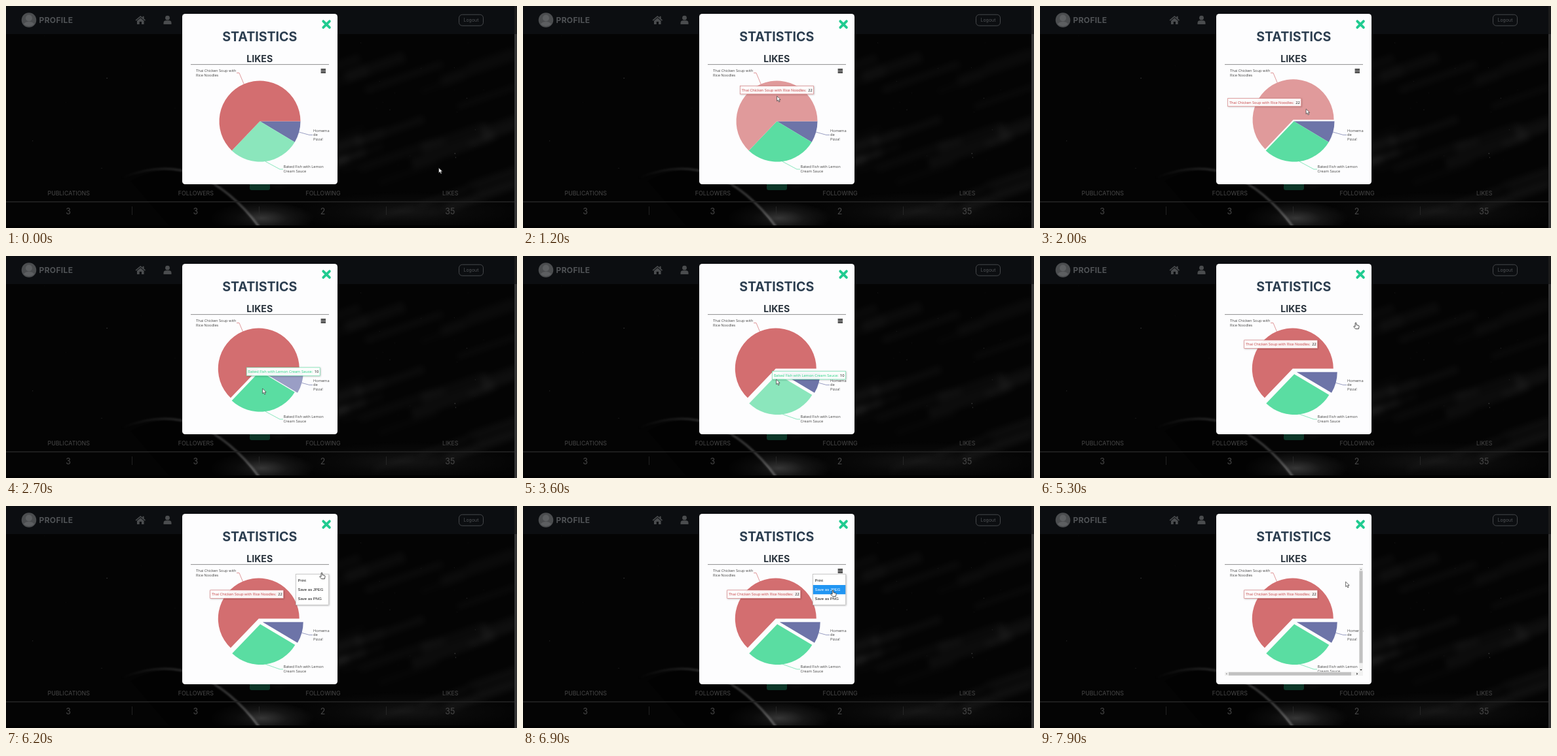
These frames come from a looping animation (780 by 340 pixels, 8 s). An HTML page:

```html
<!DOCTYPE html>
<html lang="en">
<head>
<meta charset="utf-8">
<title>Statistics</title>
<style>
  html, body { margin: 0; width: 100%; height: 100%; overflow: hidden; background: #000; }
  svg { display: block; width: 780px; height: 340px; }
  text { white-space: pre; }
  .ui { font-family: Montserrat, Inter, sans-serif; }
  .mid { text-anchor: middle; }
  .chart { font-family: "Trebuchet MS", "Open Sans", sans-serif; font-size: 5.7px; fill: #444; }
  .menu { font-family: Arial, "Liberation Sans", sans-serif; font-size: 6px; }
</style>
</head>
<body>
<svg viewBox="0 0 780 340" xmlns="http://www.w3.org/2000/svg">
  <defs>
    <radialGradient id="glow">
      <stop offset="0" stop-color="#fff" stop-opacity=".2"/>
      <stop offset=".5" stop-color="#fff" stop-opacity=".07"/>
      <stop offset="1" stop-color="#fff" stop-opacity="0"/>
    </radialGradient>
    <linearGradient id="rim">
      <stop offset="0" stop-color="#fff" stop-opacity="0"/>
      <stop offset=".45" stop-color="#fff" stop-opacity=".17"/>
      <stop offset="1" stop-color="#fff" stop-opacity=".3"/>
    </linearGradient>
    <filter id="soft" x="-20%" y="-20%" width="140%" height="140%"><feGaussianBlur stdDeviation="1.6"/></filter>
    <filter id="haze" filterUnits="userSpaceOnUse" x="0" y="0" width="780" height="340"><feGaussianBlur stdDeviation="5"/></filter>
    <filter id="shadow" x="-20%" y="-40%" width="140%" height="200%">
      <feDropShadow dx=".7" dy=".7" stdDeviation=".8" flood-opacity=".3"/>
    </filter>
  </defs>

  <rect width="780" height="340" fill="#040404"/>
  <g id="sky">
    <g id="wisps" stroke="#fff" filter="url(#haze)"></g>
    <ellipse cx="390" cy="325" rx="80" ry="26" fill="url(#glow)"/>
    <ellipse cx="610" cy="315" rx="190" ry="32" fill="url(#glow)" opacity=".35"/>
    <path d="M190 268Q240 240 290 261Q345 285 384 338H250Z" fill="#000" opacity=".5"/>
    <path d="M175 264Q235 238 290 258Q345 282 386 338" fill="none" stroke="url(#rim)" stroke-width="3" filter="url(#soft)"/>
  </g>

  <rect width="776" height="43" fill="#0c0e11"/>
  <circle cx="35" cy="21.5" r="11.3" fill="#4b4d4f"/>
  <g fill="#5d5f61">
    <circle cx="35" cy="18.5" r="5"/>
    <path d="M27 28Q29 24 35 24T43 28Q35 34 27 28Z"/>
  </g>
  <text class="ui" x="50.5" y="26" font-size="12" font-weight="700" letter-spacing=".35" fill="#505356">PROFILE</text>
  <g fill="#4a4c4e">
    <path d="M197.6 21.5L205.3 15L208.5 17.7V15.8H210.6V19.4L213 21.5L212 22.7L205.3 17.1L198.6 22.7Z"/>
    <path d="M200 22.7L205.3 18.3L210.6 22.7V28H207V24H203.7V28H200Z"/>
    <circle cx="246.5" cy="18.2" r="3.4"/>
    <path d="M240.5 28V26Q240.5 22.3 244 22.3H249Q252.5 22.3 252.5 26V28Z"/>
  </g>
  <rect x="691.5" y="13.2" width="37" height="17" rx="5" fill="none" stroke="#45474a"/>
  <text class="ui mid" x="710" y="24.2" font-size="7" fill="#505356">Logout</text>

  <path d="M0 299.8H776" stroke="#202020" stroke-width="1.8"/>
  <path d="M192.5 307V320M386.5 307V320M580.5 307V320" stroke="#2b2b2b" stroke-width=".8"/>
  <rect y="336" width="776" height="4" fill="#010101"/>
  <rect x="372" y="262" width="31" height="20" rx="3" fill="#0b3527"/>
  <g id="totals" class="ui mid" fill="#484848"></g>
  <rect x="776" width="4" height="340" fill="#1c1c1c"/>
  <rect x="776" y="43" width="4" height="297" fill="#343434"/>

  <rect x="269" y="12" width="237" height="261" rx="4.5" fill="#fdfdfe"/>
  <path d="M484.3 23.3L493.9 32.9M493.9 23.3L484.3 32.9" stroke="#20cb90" stroke-width="3.8" stroke-linecap="round"/>
  <text class="ui mid" x="387.3" y="54" font-size="19.6" font-weight="700" fill="#2c3e50">STATISTICS</text>
  <text class="ui mid" x="387.2" y="86" font-size="14.1" font-weight="700" fill="#28323c">LIKES</text>
  <path d="M282 89.6H493" stroke="#858585" stroke-width=".9"/>

  <g id="pie"></g>
  <g class="chart">
    <text x="290" y="101">Thai Chicken Soup with</text><text x="290" y="107.5">Rice Noodles</text>
    <text x="469" y="192.5">Homema</text><text x="469" y="199.2">de</text><text x="469" y="205.8">Pizza!</text>
    <text x="423.5" y="248.4">Baked Fish with Lemon</text><text x="423.5" y="255">Cream Sauce</text>
  </g>
  <path id="burger" d="M480.6 97H488M480.6 99.5H488M480.6 102H488" stroke="#000" stroke-width="1.3"/>

  <g id="tip" class="chart">
    <g filter="url(#shadow)"><rect id="tipBox" x=".5" y=".5" height="12.4" fill="#fff" fill-opacity=".92" stroke-width=".6"/></g>
    <text id="tipName" x="2.7" y="8.7" stroke-width=".12"></text>
    <text id="tipValue" y="8.7" fill="#111"></text>
  </g>

  <g id="menu" class="menu">
    <rect x="442.5" y="104.5" width="50" height="47" fill="#fff" stroke="#b5b5b5" stroke-width=".6" filter="url(#shadow)"/>
    <rect id="pick" x="442.8" width="49.4" height="14.2" fill="#2196f3"/>
  </g>

  <g id="bars">
    <path d="M282 254H487V94H493V260H282Z" fill="#f1f1f1"/>
    <rect x="487.5" y="99.5" width="5" height="141" fill="#c1c1c1"/>
    <rect x="288" y="254.5" width="187" height="5" fill="#c1c1c1"/>
    <path d="M488.5 98L490 96L491.5 98ZM285.5 255.5L283.5 257L285.5 258.5Z" fill="#999"/>
    <path d="M488.3 250L490 252.2L491.7 250ZM483.2 255.2L485.4 257L483.2 258.8Z" fill="#444"/>
  </g>

  <path id="arrow" d="M-.4 0V7.6L1.4 6L2.7 9L4.1 8.4L2.8 5.5H5.2Z" fill="#fff" stroke="#333" stroke-width=".7"/>
  <path id="hand" d="M-.9 5.5V.6Q0-.6 .9 .6V3.6L4.3 4.4Q5.2 4.7 5.1 5.7L4.4 9.6H-.3L-3.2 6.3Q-3 5-1.8 5.5L-.9 6.3Z" fill="#fff" stroke="#222" stroke-width=".8"/>
</svg>
<script>
const LOOP = 8000, STEP = 100, MENU_OPENS = 5500, PRINTS = 7800;
const CENTER = { x: 387.5, y: 176.6 }, RADIUS = 62, PULL = 4.4;
const CHART = { left: 282, right: 493 }, ROW = { top: 106.8, height: 14.2 };
const TURN = Math.PI * 2;
const $ = id => document.getElementById(id);

function set(node, attrs) {
  for (const key in attrs) node.setAttribute(key, attrs[key]);
}
function add(parent, tag, attrs, text = '') {
  const node = document.createElementNS('http://www.w3.org/2000/svg', tag);
  set(node, attrs);
  node.textContent = text;
  return parent.appendChild(node);
}
const show = (node, on) => set(node, { visibility: on ? 'visible' : 'hidden' });
const place = (node, x, y) => set(node, { transform: `translate(${x} ${y})` });
const polar = (angle, r) => [r * Math.cos(angle), r * Math.sin(angle)];

const slices = [
  { name: 'Homemade Pizza!:', value: 3, color: '#6d74a8', light: '#9a9ec5', width: 61, clicked: 2300, lead: '463 197.5H468' },
  { name: 'Baked Fish with Lemon Cream Sauce:', value: 10, color: '#5adda2', light: '#8be6bc', width: 113, clicked: 3000, lead: '418 250H423' },
  { name: 'Thai Chicken Soup with Rice Noodles:', value: 22, color: '#d36e70', light: '#e09a9b', width: 113, clicked: 1900, lead: '356 102.5H352' }
];
const fish = slices[1];
const total = slices.reduce((sum, s) => sum + s.value, 0);

// The few places the pointer heads for: arrival time, x, y.
const stops = [
  [0, 661, 248], [500, 565, 268], [900, 448, 172], [1000, 437, 142], [1200, 388, 138],
  [1500, 425, 225], [1900, 400, 150], [2300, 426, 181], [2600, 426, 181], [2700, 392, 203],
  [3200, 390, 209], [4000, 382, 152], [4300, 382, 152], [4800, 441, 145], [5200, 482, 102],
  [6200, 482, 102], [6900, 473, 129], [7100, 472, 141], [7600, 467, 116], [LOOP, 467, 116]
];
stops.splice(11, 0, [3600, 387, 189]);

function pointer(t) {
  const i = Math.max(1, stops.findIndex(s => s[0] >= t));
  const [t0, x0, y0] = stops[i - 1], [t1, x1, y1] = stops[i];
  const p = (t - t0) / (t1 - t0);
  return { x: x0 + (x1 - x0) * p, y: y0 + (y1 - y0) * p };
}

function sliceUnder({ x, y }) {
  const dx = x - CENTER.x, dy = y - CENTER.y;
  if (Math.hypot(dx, dy) > RADIUS) return null;
  const angle = (Math.atan2(dy, dx) + TURN) % TURN;
  return slices.find(s => angle < s.end);
}

// The tooltip belongs to the last slice touched, left of the pointer where it fits.
function tipGoal(t) {
  for (; t >= 0; t -= STEP) {
    const spot = pointer(t), slice = sliceUnder(spot);
    if (!slice) continue;
    let x = spot.x - 5 - slice.width;
    if (x < CHART.left) x = Math.min(spot.x + 5, CHART.right - slice.width);
    return { slice, x, y: spot.y - 18 };
  }
  return null;
}

// Trails the pointer by averaging its recent goals.
function tooltip(t) {
  const goals = [0, 1, 2].map(k => tipGoal(t - k * STEP)).filter(Boolean);
  if (!goals.length) return null;
  const mean = key => goals.reduce((sum, g) => sum + g[key], 0) / goals.length;
  return { slice: goals[0].slice, x: mean('x'), y: mean('y') };
}

function buildPie() {
  let start = 0;
  for (const s of slices) {
    s.end = start + s.value / total * TURN;
    s.middle = (start + s.end) / 2;
    const large = s.end - start > Math.PI ? 1 : 0;
    s.line = add($('pie'), 'path', { fill: 'none', stroke: s.color, 'stroke-width': .7 });
    s.shape = add($('pie'), 'path', {
      d: `M0 0L${polar(start, RADIUS)}A${RADIUS} ${RADIUS} 0 ${large} 1 ${polar(s.end, RADIUS)}Z`
    });
    start = s.end;
  }
}

function buildSky() {
  let seed = 7;
  const random = () => (seed = seed * 16807 % 2147483647) / 2147483647;
  for (let i = 0; i < 45; i++) {
    add($('sky'), 'circle', { cx: random() * 776, cy: 45 + random() * 210, r: .3 + random() * .5, fill: '#fff', opacity: random() * .22 });
  }
  for (let i = 0; i < 30; i++) {
    const x = 400 + random() * 330, y = 90 + random() * 240, length = 60 + random() * 90;
    add($('wisps'), 'path', { d: `M${x} ${y}l${length} ${-length * .35}`, 'stroke-width': 5 + random() * 14, opacity: .01 + random() * .03 });
  }
}

function buildLabels() {
  [['PUBLICATIONS', 3], ['FOLLOWERS', 3], ['FOLLOWING', 2], ['LIKES', 35]].forEach(([label, count], i) => {
    const x = 95.7 + i * 194.2;
    add($('totals'), 'text', { x, y: 290, 'font-size': 8.9 }, label);
    add($('totals'), 'text', { x: x - .5, y: 318.6, 'font-size': 12.4 }, count);
  });
  ['Print', 'Save as JPEG', 'Save as PNG'].forEach((label, i) => {
    add($('menu'), 'text', { x: 445.5, y: ROW.top + 9.2 + i * ROW.height }, label);
  });
}

function drawPie(t, lit) {
  const [px, py] = [CENTER.x, CENTER.y];
  for (const s of slices) {
    const p = Math.min(1, Math.max(0, (t - s.clicked) / 300));
    const pull = PULL * p * (2 - p);
    const [dx, dy] = polar(s.middle, pull), [ex, ey] = polar(s.middle, pull + RADIUS);
    place(s.shape, px + dx, py + dy);
    set(s.shape, { fill: s === lit ? s.light : s.color });
    set(s.line, { d: `M${px + ex} ${py + ey}L${s.lead}` });
  }
}

function drawTip(tip) {
  show($('tip'), !!tip);
  if (!tip) return;
  const { name, value, color, width } = tip.slice;
  place($('tip'), tip.x, tip.y);
  set($('tipBox'), { width: width - 1, stroke: color });
  set($('tipName'), { fill: color, stroke: color });
  $('tipName').textContent = name;
  set($('tipValue'), { x: width - 9 });
  $('tipValue').textContent = value;
}

function drawMenu(t, spot) {
  const printed = t >= PRINTS, open = t >= MENU_OPENS && !printed;
  const onButton = spot.x > 476 && spot.x < CHART.right && spot.y > 94 && spot.y < ROW.top;
  const row = open ? Math.floor((spot.y - ROW.top) / ROW.height) : -1;
  show($('burger'), !onButton && !printed);
  show($('menu'), open);
  show($('pick'), row >= 0);
  set($('pick'), { y: ROW.top + row * ROW.height });
  document.querySelectorAll('#menu text').forEach((item, i) => set(item, { fill: i === row ? '#fff' : '#111' }));
  show($('bars'), printed);
  show($('hand'), onButton || open);
  show($('arrow'), !onButton && !open);
}

function draw(t) {
  const spot = pointer(t), tip = tooltip(t);
  // Highlights lag one step; the fish slice is still lit when the loop opens.
  drawPie(t, tip ? sliceUnder(pointer(Math.max(0, t - STEP))) : fish);
  drawTip(tip);
  drawMenu(t, spot);
  place($('arrow'), spot.x, spot.y);
  place($('hand'), spot.x, spot.y);
}

buildPie();
buildSky();
buildLabels();
const start = performance.now();
function tick() {
  const t = (performance.now() - start) % LOOP;
  draw(Math.floor(t / STEP) * STEP);
  requestAnimationFrame(tick);
}
draw(0);
requestAnimationFrame(tick);
</script>
</body>
</html>
```
